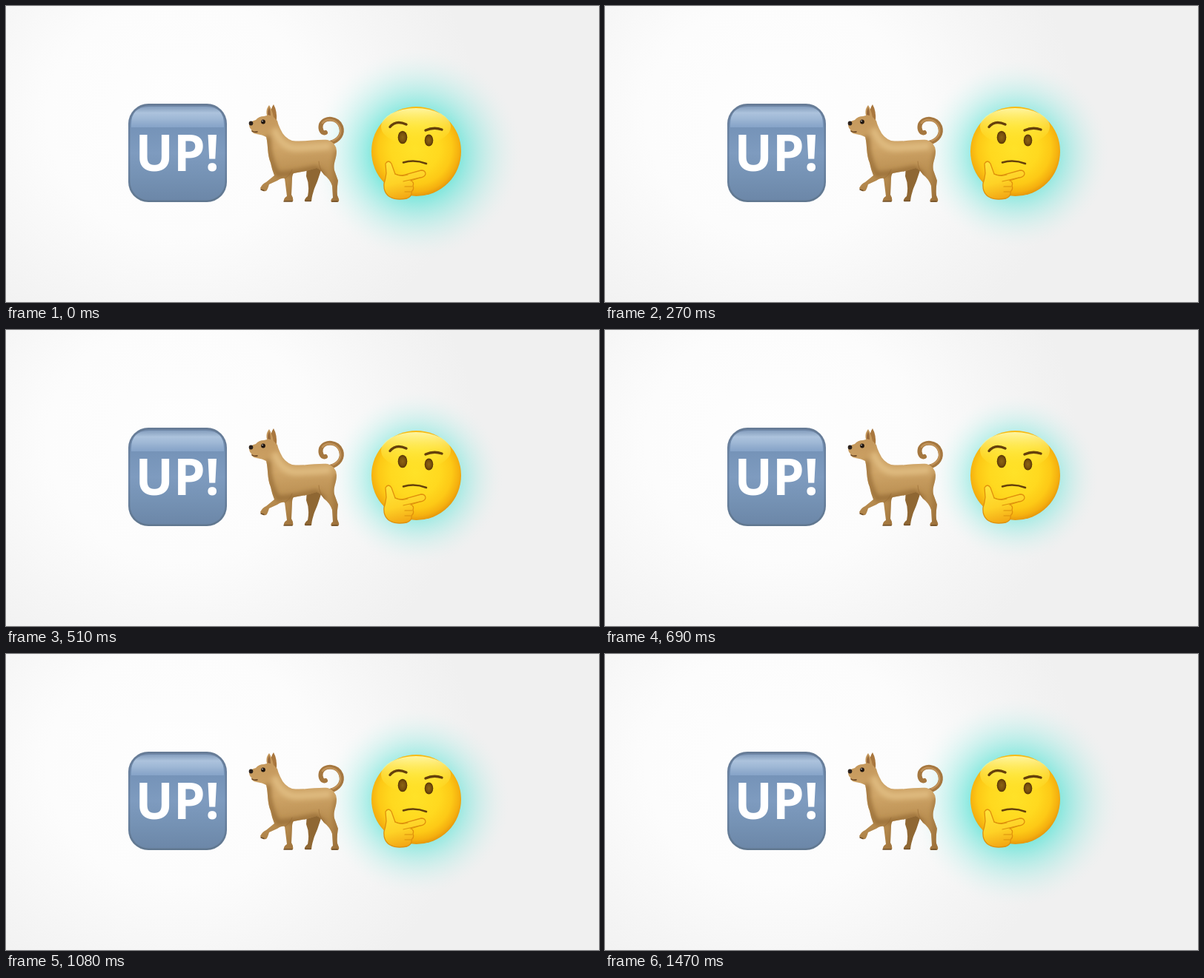
An HTML page for the animation above (1.5 s loop, 800x400 px).

```html
<!DOCTYPE html>
<html lang="en">
<head>
<meta charset="utf-8">
<title>Up, dog, thinking</title>
<style>
  html, body { margin: 0; width: 100%; height: 100%; overflow: hidden; background: #f1f1f1; }
  svg { display: block; width: 800px; height: 400px; }
  .label { font: 700 68px "Open Sans", sans-serif; fill: #fff; }
  .line { fill: none; stroke-linecap: round; stroke-linejoin: round; }
</style>
</head>
<body>
<svg viewBox="0 0 800 400">
  <defs>
    <radialGradient id="paper" gradientUnits="userSpaceOnUse" cx="235" cy="150" r="400" gradientTransform="translate(0 15) scale(1 .9)">
      <stop offset="0" stop-color="#fefefe"/>
      <stop offset=".45" stop-color="#fcfcfc"/>
      <stop offset=".75" stop-color="#f5f5f5"/>
      <stop offset="1" stop-color="#f0f0f0"/>
    </radialGradient>
    <radialGradient id="glow" gradientUnits="userSpaceOnUse" cx="553" cy="200" r="150"></radialGradient>

    <linearGradient id="button" x2="0" y2="1">
      <stop offset="0" stop-color="#7088a8"/>
      <stop offset=".22" stop-color="#7593b8"/>
      <stop offset=".5" stop-color="#7e9bbf"/>
      <stop offset=".75" stop-color="#7592b4"/>
      <stop offset="1" stop-color="#6c87a8"/>
    </linearGradient>
    <linearGradient id="rim" x2="0" y2="1">
      <stop offset="0" stop-color="#667b95"/>
      <stop offset=".5" stop-color="#6c86a8"/>
      <stop offset="1" stop-color="#60778f"/>
    </linearGradient>
    <linearGradient id="shine" x2="0" y2="1">
      <stop offset="0" stop-color="#8ba4c3" stop-opacity=".8"/>
      <stop offset=".3" stop-color="#b3c9e2" stop-opacity=".9"/>
      <stop offset=".6" stop-color="#a5bedb" stop-opacity=".85"/>
      <stop offset="1" stop-color="#8facd0" stop-opacity=".65"/>
    </linearGradient>

    <linearGradient id="fur" gradientUnits="userSpaceOnUse" x1="380" y1="140" x2="390" y2="264">
      <stop offset="0" stop-color="#c3965a"/>
      <stop offset=".4" stop-color="#cfa568"/>
      <stop offset=".65" stop-color="#bd9255"/>
      <stop offset="1" stop-color="#a47840"/>
    </linearGradient>
    <path id="dog" d="M328 159Q330 156 337 154Q341 149 348 149L352 148Q350 140 355 134Q359 140 361 150L366 155Q367 160 370 166Q375 178 386 182C400 184 420 180 434 181Q445 184 446 196C446 207 441 212 443 222L448 236Q446 248 447 256L449 261Q450 265 446 265L439 265Q437 262 441 259L440 243Q437 234 429 228Q424 220 419 219Q404 224 388 226Q386 228 386 233L385 255Q388 260 387 264L375 264Q374 260 379 257L376 233Q372 232 366 236L355 241Q353 248 351 250Q345 251 343 246Q346 240 351 238L362 229Q359 222 357 212C352 200 354 188 351 177Q346 174 338 173Q331 172 331 167Q328 165 328 159Z"/>
    <clipPath id="dogClip"><use href="#dog"/></clipPath>

    <radialGradient id="skin" gradientUnits="userSpaceOnUse" cx="552" cy="192" r="66">
      <stop offset="0" stop-color="#ffe228"/>
      <stop offset=".5" stop-color="#ffd91f"/>
      <stop offset=".75" stop-color="#fdc916"/>
      <stop offset=".9" stop-color="#f5b00f"/>
      <stop offset="1" stop-color="#e3930c"/>
    </radialGradient>
    <linearGradient id="top" x2="0" y2="1">
      <stop offset="0" stop-color="#fffbb0" stop-opacity=".9"/>
      <stop offset=".5" stop-color="#fff25a" stop-opacity=".5"/>
      <stop offset="1" stop-color="#ffe92f" stop-opacity="0"/>
    </linearGradient>
    <linearGradient id="hand" gradientUnits="userSpaceOnUse" x1="520" y1="212" x2="532" y2="262">
      <stop offset="0" stop-color="#ffe23a"/>
      <stop offset=".55" stop-color="#fed226"/>
      <stop offset="1" stop-color="#f2a514"/>
    </linearGradient>
    <radialGradient id="eye">
      <stop offset="0" stop-color="#8a6414"/>
      <stop offset=".6" stop-color="#7a510e"/>
      <stop offset="1" stop-color="#563406"/>
    </radialGradient>
    <filter id="soft" x="-50%" y="-50%" width="200%" height="200%"><feGaussianBlur stdDeviation="3"/></filter>
  </defs>

  <rect width="800" height="400" fill="url(#paper)"/>
  <circle cx="553" cy="200" r="150" fill="url(#glow)"/>

  <g id="upButton">
    <rect x="165" y="132" width="133" height="133" rx="27" fill="url(#rim)"/>
    <rect x="167.500" y="134.500" width="128" height="128" rx="25" fill="url(#button)"/>
    <path d="M169 164V160Q169 136 193 136H270Q294 136 294 160V164Z" fill="url(#shine)"/>
    <text class="label" x="174.500" y="223">UP!</text>
  </g>

  <g id="walkingDog">
    <path d="M357 149Q357 138 361 133Q366 142 365 155Z" fill="#a9773e"/>
    <path d="M406 216L405 230Q410 242 407 257Q402 261 403 264H412Q413 252 420 237L426 219Z" fill="#8f6733"/>
    <path class="line" d="M437 185C450 182 455 172 452 163C448 151 430 149 425 160C423 167 427 173 431 171" stroke="#a5773f" stroke-width="6"/>
    <path class="line" d="M441 182C450 178 453 171 450 163C446 153 433 151 427 158" stroke="#c09259" stroke-width="2.500"/>
    <use href="#dog" fill="url(#fur)"/>
    <g clip-path="url(#dogClip)">
      <g fill="none" filter="url(#soft)">
        <path d="M362 166Q370 190 390 192Q416 191 438 189" stroke="#dfbb80" stroke-width="9"/>
        <path d="M353 176Q355 212 367 228Q390 226 418 219L430 229" stroke="#966c34" stroke-width="6"/>
        <path d="M447 195Q441 214 446 232V265M388 228V265" stroke="#966c34" stroke-width="4"/>
      </g>
    </g>
    <path class="line" d="M376 233Q383 229 386 221M429 227Q422 219 422 210" stroke="#966a32" stroke-opacity=".6"/>
    <path d="M353 147Q353 141 355 137Q357 142 357 148Z" fill="#96673a"/>
    <path class="line" d="M332 169Q335 171 339 170" stroke="#5f3b1c" stroke-width="1.500"/>
    <ellipse cx="330.500" cy="158.500" rx="2.800" ry="3" fill="#2b211c"/>
    <circle cx="347" cy="156.500" r="2.900" fill="#21160f"/>
    <circle cx="346" cy="155.500" r=".8" fill="#eee"/>
    <path class="line" d="M375 264H386M344 248L348 249.500M440 264H447M404 263.500H411" stroke="#6f4d26" stroke-width="1.500"/>
  </g>

  <g id="thinkingFace">
    <circle cx="553.500" cy="196.500" r="60.500" fill="url(#skin)"/>
    <ellipse cx="553" cy="163" rx="47" ry="25" fill="url(#top)"/>
    <ellipse cx="535" cy="177.500" rx="6.300" ry="8.800" fill="url(#eye)"/>
    <ellipse cx="570.500" cy="181.500" rx="5.800" ry="8" fill="url(#eye)"/>
    <path class="line" d="M518 163.500Q526 153.500 540 160M566 168Q577 163 588 167" stroke="#65400b" stroke-width="3.400"/>
    <path class="line" d="M536 211.500Q551 207 567 213" stroke="#65400b" stroke-width="2.600"/>
    <path d="M512 213Q516 207 520 213L525 227Q532 230 538 228L560 222Q566 222 566 227Q565 231 559 232L546 236Q551 238 549 243Q551 248 547 251Q548 257 541 260Q527 263 518 258Q509 253 510 240Q512 234 513 226Z" fill="url(#hand)" stroke="#e0900c" stroke-width="1.300"/>
    <path class="line" d="M525 227Q533 231 542 228M536 237L558 232M538 244H548M538 251H546" stroke="#dc920c" stroke-width="1.200"/>
  </g>
</svg>
<script>
  const LOOP = 1500, STEP = 30, RADIUS = 150, STOPS = 24;
  // [time in ms, glow strength]
  const pulse = [[0, 1], [270, .5], [510, .15], [690, 0], [900, .2], [1080, .46], [1320, .82], [1500, 1]];
  const mix = (a, b, k) => a + (b - a) * k;

  const glow = document.getElementById('glow');
  const stops = Array.from({ length: STOPS + 1 }, (_, i) => {
    const stop = document.createElementNS('http://www.w3.org/2000/svg', 'stop');
    stop.setAttribute('offset', i / STOPS);
    stop.setAttribute('stop-color', 'rgb(64,224,208)');
    return glow.appendChild(stop);
  });

  function strengthAt(t) {
    const i = pulse.findIndex(p => p[0] > t);
    const [t0, a] = pulse[i - 1], [t1, b] = pulse[i];
    return mix(a, b, (t - t0) / (t1 - t0));
  }

  function draw(now) {
    const t = Math.floor((now % LOOP) / STEP) * STEP;
    const k = strengthAt(t);
    const inner = 54, outer = mix(114, 144, k), peak = mix(.44, .68, k);
    stops.forEach((stop, i) => {
      const r = i / STOPS * RADIUS;
      const x = Math.min(1, Math.max(0, (outer - r) / (outer - inner)));
      stop.setAttribute('stop-opacity', peak * x ** 1.9);
    });
  }

  const start = performance.now();
  function tick() {
    draw(performance.now() - start);
    requestAnimationFrame(tick);
  }
  tick();
</script>
</body>
</html>
```
